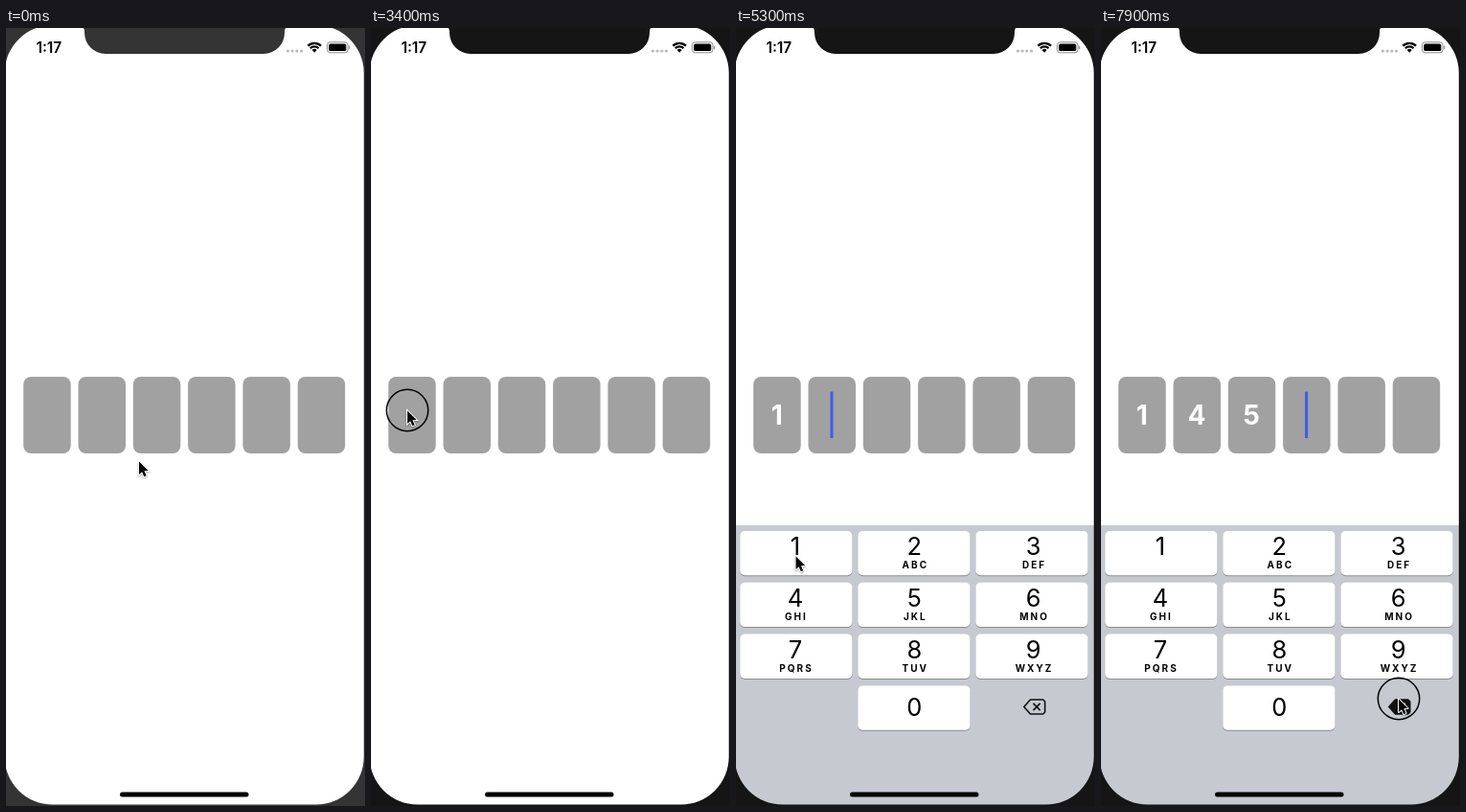
An HTML page with a canvas that plays this animation: 375 by 812 pixels, repeating every 8 s.

```html
<!DOCTYPE html>
<html lang="en">
<head>
<meta charset="utf-8">
<title>Code entry</title>
<style>
html, body { margin: 0; width: 100%; height: 100%; overflow: hidden; background: #fff; }
canvas { display: block; }
</style>
</head>
<body>
<canvas id="stage" width="375" height="812"></canvas>
<script>
const ctx = document.getElementById('stage').getContext('2d');
const LOOP = 8000, STEP = 100;
const FOCUS = 3563, ACTIVE = 3000;
const LETTERS = ['', 'ABC', 'DEF', 'GHI', 'JKL', 'MNO', 'PQRS', 'TUV', 'WXYZ'];

// time, x, y of the pointer tip
const PATH = [
  [0, 139, 452], [1950, 139, 452], [2400, 101, 438], [2800, 38, 399], [3850, 38, 399],
  [4300, 45, 412], [4950, 62, 546], [5250, 62, 546], [5700, 67, 591], [6000, 67, 591],
  [6300, 182, 597], [6500, 182, 597], [6800, 168, 552], [7050, 168, 552],
  [7700, 311, 700], [LOOP, 311, 700]
];

// touch time, key, time the text changes, text
const TAPS = [
  [3400, '', 3400, ''], [5000, '1', 5300, '1'], [5700, '4', 6000, '14'],
  [6300, '5', 6600, '145'], [6800, '2', 7100, '1452'], [7800, 'del', 7900, '145']
];

function box(x, y, w, h, r, color) {
  ctx.beginPath();
  ctx.roundRect(x, y, w, h, r);
  ctx.fillStyle = color;
  ctx.fill();
}

function text(str, x, y, size, weight, color = '#000', spacing = 0) {
  ctx.font = `${weight} ${size}px Inter, Roboto, sans-serif`;
  ctx.letterSpacing = spacing + 'px';
  ctx.textAlign = 'center';
  ctx.fillStyle = color;
  ctx.fillText(str, x + spacing / 2, y);
  ctx.letterSpacing = '0px';
}

function line(points, closed) {
  ctx.beginPath();
  points.forEach(([x, y]) => ctx.lineTo(x, y));
  if (closed) ctx.closePath();
}

function stroke(color, width) {
  ctx.strokeStyle = color;
  ctx.lineWidth = width;
  ctx.stroke();
}

function pointerAt(t) {
  const i = PATH.findIndex(p => p[0] > t);
  const [t0, x0, y0] = PATH[i - 1], [t1, x1, y1] = PATH[i];
  const k = (t - t0) / (t1 - t0);
  return [x0 + (x1 - x0) * k, y0 + (y1 - y0) * k];
}

function drawStatus() {
  text('1:17', 44.8, 25.5, 15.4, 600);
  for (let i = 0; i < 4; i++) box(292.8 + i * 4.7, 22.4, 3.2, 3.2, 1.6, '#b9b9b9');

  for (const r of [9.7, 6.1]) {
    ctx.beginPath();
    ctx.arc(322.2, 25.5, r, -Math.PI * 0.75, -Math.PI * 0.25);
    stroke('#000', 2.3);
  }
  ctx.beginPath();
  ctx.moveTo(322.2, 25.8);
  ctx.arc(322.2, 25.5, 3.5, -Math.PI * 0.75, -Math.PI * 0.25);
  ctx.fillStyle = '#000';
  ctx.fill();

  ctx.beginPath();
  ctx.roundRect(335.5, 14.8, 21.5, 11, 3);
  stroke('#8c8c8c', 1);
  box(337.2, 16.5, 18.1, 7.6, 1.6, '#000');
  box(358, 18.5, 1.3, 3.8, 0.8, '#999');
}

function drawCells(t, code) {
  for (let i = 0; i < 6; i++) {
    const x = 18.2 + i * 57.3;
    box(x, 364, 49.5, 80, 8, '#a1a1a1');
    if (code[i]) text(code[i], x + 24.5, 414, 28, 700, '#fff');
  }
  const blinkOn = (t + 100) % 1000 < 500;
  if (t >= FOCUS && blinkOn) box(41.2 + code.length * 57.3, 379.5, 3, 48.5, 0, '#405be6');
}

function drawDelete(y, pressed) {
  line([[300.8, y + 8.5], [307.5, y + 1], [320.7, y + 1], [322.7, y + 3],
    [322.7, y + 14], [320.7, y + 16], [307.5, y + 16]], true);
  ctx.lineJoin = 'round';
  ctx.fillStyle = '#111';
  if (pressed) ctx.fill();
  stroke('#111', 1.6);
  for (const s of [1, -1]) {
    line([[310.5, y + 8.5 - 3.6 * s], [317.7, y + 8.5 + 3.6 * s]]);
    stroke(pressed ? '#fff' : '#111', 1.6);
  }
}

function drawKeyboard(t, pressed) {
  if (t < FOCUS) return;
  // Critically damped spring
  const p = (t - FOCUS) / 1000 * 18.26;
  const top = 519 + 293 * (1 + p) * Math.exp(-p);
  box(-1, top, 376, 300, 0, '#c6cad0');
  for (let i = 0; i < 10; i++) {
    const last = i === 9;
    const col = last ? 1 : i % 3;
    const x = 4.2 + col * 123.1, mid = 62 + col * 124.3;
    const y = top + 6 + Math.floor(i / 3) * 53.8;
    const digit = last ? '0' : String(i + 1);
    box(x, y + 1, 117.2, 46.3, 5, '#898c91');
    box(x, y, 117.2, 46.3, 5, pressed === digit ? '#a9b7c9' : '#fff');
    text(digit, mid, y + (last ? 32 : 25.3), 25.5, 400);
    if (!last) text(LETTERS[i], mid, y + 39.4, 10, 700, '#000', 2);
  }
  drawDelete(top + 181, pressed === 'del');
}

function drawBezel(color) {
  ctx.fillStyle = color;
  ctx.beginPath();
  ctx.rect(-5, -5, 385, 822);
  ctx.roundRect(-1.4, -3, 375.2, 813.6, 50);
  ctx.fill('evenodd');

  ctx.beginPath();
  ctx.moveTo(76, -2);
  ctx.quadraticCurveTo(82, -2, 82, 4);
  ctx.arcTo(82, 27, 104, 27, 22);
  ctx.arcTo(291, 27, 291, 4, 22);
  ctx.lineTo(291, 4);
  ctx.quadraticCurveTo(291, -2, 297, -2);
  ctx.fill();
}

function drawPointer(x, y, ring) {
  if (ring) {
    ctx.beginPath();
    ctx.arc(x, y, 21.7, 0, Math.PI * 2);
    stroke('#000', 1.5);
  }
  ctx.save();
  ctx.translate(x, y);
  line([[0, 0.5], [0, 14], [3.1, 11.2], [5.3, 16.2], [7.6, 15.2], [5.4, 10.3], [9.6, 10.1]], true);
  ctx.shadowColor = 'rgba(0,0,0,.35)';
  ctx.shadowBlur = 2;
  ctx.shadowOffsetY = 1;
  stroke('#fff', 2);
  ctx.shadowColor = 'transparent';
  ctx.fillStyle = '#000';
  ctx.fill();
  ctx.restore();
}

function draw(t) {
  let code = '', pressed = '', ring = false;
  for (const [at, key, changeAt, value] of TAPS) {
    const dt = t - at;
    if (t >= changeAt) code = value;
    if (dt >= 0 && dt < 200) ring = true;
    if (dt >= 100 && dt < 300) pressed = key;
  }
  box(0, 0, 375, 812, 0, '#fff');
  drawCells(t, code);
  drawKeyboard(t, pressed);
  drawStatus();
  drawBezel(t < ACTIVE ? '#343434' : '#151515');
  box(119, 797.5, 134.5, 5, 2.5, '#000');
  drawPointer(...pointerAt(t), ring);
}

function frame() {
  draw(Math.floor(performance.now() % LOOP / STEP) * STEP);
  requestAnimationFrame(frame);
}
frame();
</script>
</body>
</html>
```
